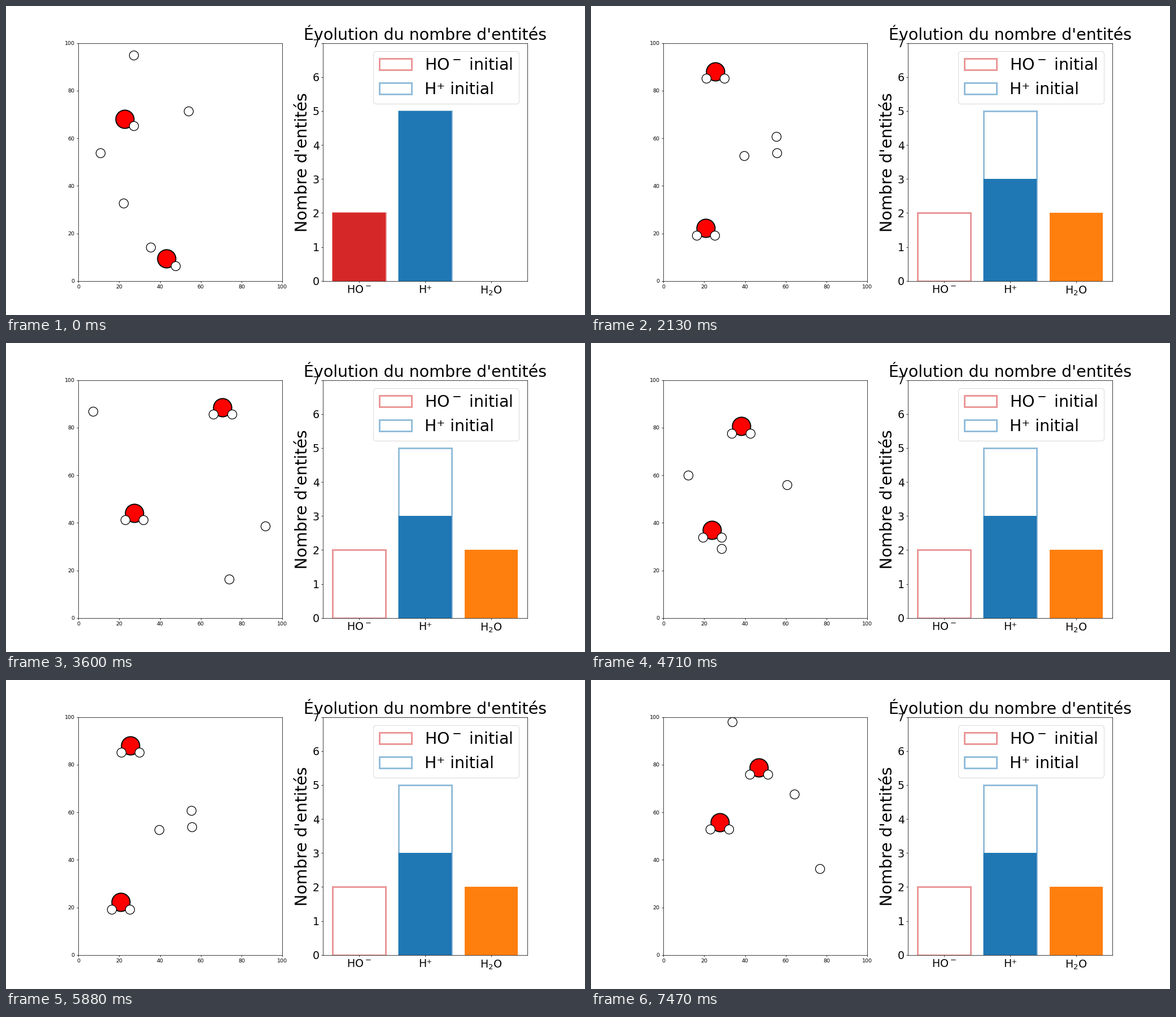
These frames come from a looping animation (1025 by 547 pixels, 7.5 s). A matplotlib script:

```python
import numpy as np
import matplotlib.pyplot as plt
from matplotlib.animation import FuncAnimation

DPI = 1025 / 15
LOOP = 125               # the reaction plays twice per loop
LO, HI = 6, 99           # walls the particles bounce on
REACH = 5                # distance at which HO- captures H+
ARM = np.array([4.5, -3])


def track(start, velocity):
    """Straight flight at constant velocity, reflected by the walls."""
    steps = np.arange(LOOP)[:, None]
    u = np.array(start) - LO + steps * np.array(velocity)
    span = 2 * (HI - LO)
    return LO + np.minimum(u % span, -u % span)


oxygens = [track((43.1, 9.4), (-5.97, -2.44)),
           track((22.6, 68.2), (0.04, 2.9))]
captured = [track((35.3, 14.1), (-1, -2.5)),
            track((10.7, 53.9), (0.9, 2.5))]
free = [track((27.2, 95), (6.86, 7.28)),
        track((54, 71.5), (-6.61, -2.77)),
        track((22.2, 32.8), (-0.7, -4.96))]
react = [np.argmax(np.hypot(*(o - h).T) < REACH)
         for o, h in zip(oxygens, captured)]

fig, (box, chart) = plt.subplots(1, 2, figsize=(1025.001 / DPI, 547.001 / DPI), dpi=DPI)

box.set(xlim=(0, 100), ylim=(0, 100))
ball = dict(ls="none", marker="o", mec="black")
big, = box.plot([], [], ms=34, mfc="red", mew=2, **ball)
small, = box.plot([], [], ms=17, mfc="white", mew=1.3, **ball)

names = ["HO$^-$", "H⁺", "H$_2$O"]
colors = ["tab:red", "tab:blue", "tab:orange"]
initial = [2, 5, 0]
for i in range(2):
    chart.bar(i, initial[i], fill=False, edgecolor=colors[i], lw=3, alpha=0.5,
              label=names[i] + " initial")
bars = chart.bar(range(3), initial, color=colors)
chart.set(xlim=(-0.54, 2.54), ylim=(0, 7))
chart.set_xticks(range(3), names)
chart.set_yticks(range(8))
chart.tick_params(labelsize=20)
chart.set_title("Évolution du nombre d'entités", fontsize=30)
chart.set_ylabel("Nombre d'entités", fontsize=30)
chart.legend(fontsize=30, loc="upper right")


def update(frame):
    step = frame % LOOP
    centers = [o[step] for o in oxygens]
    hydrogens = [h[step] for h in free]
    for center, h, when in zip(centers, captured, react):
        hydrogens.append(center + ARM)
        hydrogens.append(center + ARM * (-1, 1) if step >= when else h[step])
    big.set_data(*np.transpose(centers))
    small.set_data(*np.transpose(hydrogens))

    water = sum(step >= when for when in react)
    for bar, count, change in zip(bars, initial, (-1, -1, 1)):
        bar.set_height(count + change * water)
    return big, small, *bars


anim = FuncAnimation(fig, update, frames=2 * LOOP, interval=30, repeat=True,
                     repeat_delay=0)
plt.show()
```
